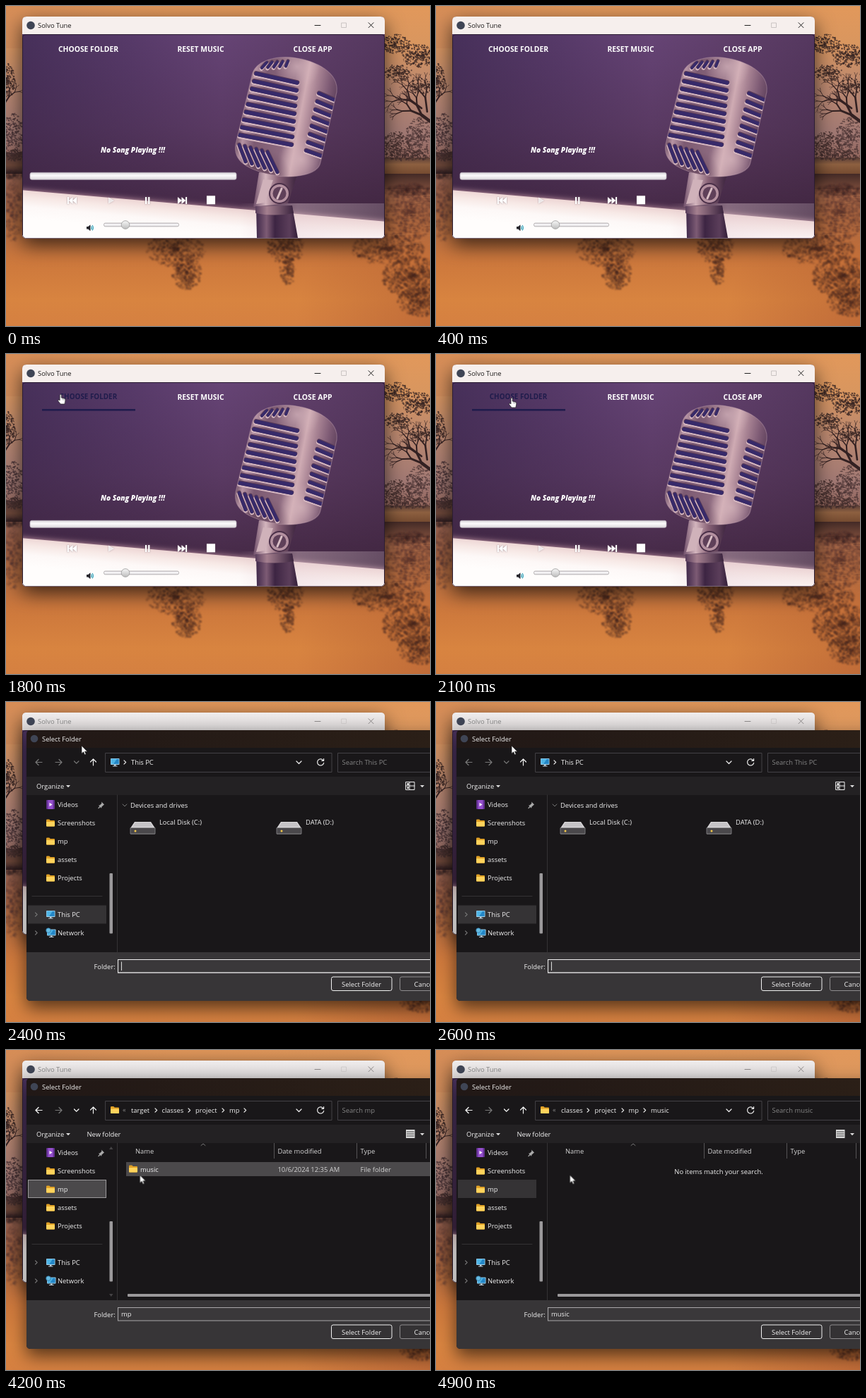
An HTML page with a canvas that plays this animation: 600x454 px, repeating every 5 s.

```html
<!DOCTYPE html>
<html lang="en">
<head>
<meta charset="utf-8">
<title>Music player</title>
<style>
html, body { margin: 0; width: 100%; height: 100%; overflow: hidden; background: #d08a50; }
canvas, svg { position: absolute; left: 0; top: 0; width: 600px; height: 454px; display: block; }
text { font-family: "Open Sans", "Noto Sans", sans-serif; font-size: 9.4px; fill: #f1f1f1; white-space: pre; }
.dark { fill: #1c1a1a; }
.dim { fill: #858585; }
.menu text, .hover text { font-weight: 700; font-size: 10.35px; text-anchor: middle; fill: #fff; }
.hover text { font-size: 9.9px; fill: #201c4c; }
.song { font-weight: 800; font-style: italic; font-size: 10.1px; text-anchor: middle; fill: #fff; }
.line { fill: none; stroke: #eee; stroke-width: 1.2; stroke-linecap: round; stroke-linejoin: round; }
.gray { stroke: #777; }
.thin { stroke-width: 1; }
.white { fill: #fff; filter: drop-shadow(0 0 1px #7a6670aa); }
.shadow { filter: drop-shadow(0 10px 12px #0009); }

/* Scene states */
.hover, .dialog, .inactive, .bare, .full, .pc, .mp, .music, .row, .over, .typed, .hand, .arrow, .caret {
  opacity: 0; animation: 5s step-end infinite;
}
.plain { animation: plain 5s step-end infinite; }
.hover { animation-name: hover; }
.dialog { animation-name: dialog; }
.inactive { animation-name: inactive; }
.bare { animation-name: bare; }
.full { animation-name: full; }
.pc { animation-name: pc; }
.mp { animation-name: mp; }
.music { animation-name: music; }
.row { animation-name: row; }
.over { animation-name: over; }
.typed { animation-name: typed; }
.caret { animation-name: caret; }
.hand { animation-name: hand; }
.arrow { animation-name: arrow; }
.pointer { animation: move 5s infinite; }
@keyframes plain { 36% { opacity: 0 } 48%, 100% { opacity: 1 } }
@keyframes hover { 36% { opacity: 1 } 48% { opacity: 0 } }
@keyframes dialog { 46% { opacity: .6 } 48%, 100% { opacity: 1 } }
@keyframes inactive { 46%, 100% { opacity: 1 } }
@keyframes bare { 46% { opacity: 1 } 54% { opacity: 0 } }
@keyframes full { 54% { opacity: 1 } 74% { opacity: 0 } }
@keyframes pc { 46% { opacity: 1 } 74% { opacity: 0 } }
@keyframes mp { 74% { opacity: 1 } 88% { opacity: 0 } }
@keyframes music { 88%, 100% { opacity: 1 } }
@keyframes row { 80% { opacity: 1 } 88% { opacity: 0 } }
@keyframes over { 66% { opacity: 1 } 74% { opacity: 0 } }
@keyframes typed { 74%, 100% { opacity: 1 } }
@keyframes caret { 48% { opacity: 1 } 56% { opacity: 0 } }
@keyframes hand { 36% { opacity: 1 } 46% { opacity: 0 } 62% { opacity: 1 } 72% { opacity: 0 } }
@keyframes arrow { 24% { opacity: 1 } 36% { opacity: 0 } 46% { opacity: 1 } 62% { opacity: 0 } 72%, 100% { opacity: 1 } }
@keyframes move {
  0%, 24% { transform: translate(-4px, 44px); animation-timing-function: step-end }
  26% { transform: translate(2.5px, 44.5px); animation-timing-function: steps(7, end) }
  40%, 54% { transform: translate(107px, 62px); animation-timing-function: steps(6, end) }
  66%, 72% { transform: translate(82.5px, 202px); animation-timing-function: steps(5, end) }
  82%, 100% { transform: translate(189.5px, 177.5px) }
}
</style>
</head>
<body>
<canvas id="scene" width="600" height="454"></canvas>
<svg viewBox="0 0 600 454">
  <defs>
    <linearGradient id="bar" x2="0" y2="1">
      <stop stop-color="#d5d1d6"/><stop offset=".4" stop-color="#fcfbfc"/><stop offset="1" stop-color="#dcd8dc"/>
    </linearGradient>
    <linearGradient id="knob" x2="0" y2="1"><stop stop-color="#f7f7f7"/><stop offset="1" stop-color="#bdbdbd"/></linearGradient>
    <linearGradient id="caption"><stop stop-color="#211816"/><stop offset="1" stop-color="#2b1f17"/></linearGradient>
    <linearGradient id="idle" x2="0" y2="1"><stop stop-color="#f0eded"/><stop offset="1" stop-color="#d6d2d2"/></linearGradient>
    <g id="folder">
      <path d="M0 1.2Q0 0 1.2 0H4.2L5.8 1.6H11Q12 1.6 12 2.8V9Q12 10 11 10H1Q0 10 0 9Z" fill="#e0a126"/>
      <path d="M0 3.4H11Q12 3.4 12 4.2V9Q12 10 11 10H1Q0 10 0 9Z" fill="#ffd35c"/>
    </g>
    <g id="monitor">
      <rect width="12.5" height="9" rx=".8" fill="#a9d7ee"/><rect x=".8" y=".8" width="10.9" height="7.2" fill="#2487c7"/>
      <path d="M.8 .8H9L4 8H.8Z" fill="#4fb5e6"/><path d="M5 9h2.5v1.5H9.5v1H3v-1h2Z" fill="#b8c6cf"/>
    </g>
    <g id="drive">
      <path d="M6 0H29L35 9H0Z" fill="#d9d7d9"/><path d="M7 1H28L32 7H3Z" fill="#c5c3c6"/>
      <rect y="8.5" width="35" height="9.5" rx="1" fill="#4a484b"/>
      <path d="M0 8.5H35V17H0Z" fill="none" stroke="#8a888b" stroke-width=".8"/><circle cx="7" cy="13" r="1.5" fill="#f2c84b"/>
    </g>
    <path id="next" d="M0 -2.6L2.6 0L0 2.6"/>
    <path id="skip" d="M-6.5 -5L-.8 0L-6.5 5ZM-1 -5L4.7 0L-1 5ZM4.6 -5h2V5h-2Z"/>
    <path id="controls" d="M437 27.5h8M475 24h6.500v6.500h-6.500ZM513 23.700l7 7m0-7l-7 7"/>
  </defs>

  <!-- Player window -->
  <path d="M23 40V21Q23 15 29 15H530Q536 15 536 21V40Z" fill="#f6efed"/>
  <circle cx="35" cy="27.5" r="5.8" fill="#3f4555"/>
  <text class="dark" x="45" y="31">Solvo Tune</text>
  <path class="line thin" d="M437 27.5h8M513 23.7l7 7m0-7l-7 7" style="stroke:#222"/>
  <path class="line thin" d="M475 24h6.5v6.5h-6.5Z" style="stroke:#c9c3c2"/>
  <g class="menu">
    <text class="plain" x="116.5" y="65">CHOOSE FOLDER</text>
    <text x="275.5" y="65">RESET MUSIC</text>
    <text x="434" y="65">CLOSE APP</text>
  </g>
  <g class="hover">
    <text x="116.5" y="64">CHOOSE FOLDER</text>
    <rect x="51" y="78" width="132" height="2.6" fill="#201c4c"/>
  </g>
  <text class="song" x="179.5" y="208">No Song Playing !!!</text>
  <rect x="34" y="236.3" width="292" height="10" rx="2.5" fill="url(#bar)" stroke="#b9b0bc" stroke-width=".8"/>
  <g class="white">
    <use href="#skip" transform="translate(93.5 276) scale(-1 1)"/>
    <path d="M145 271.5L153 276L145 280.5Z" opacity=".75"/>
    <path d="M197 271h2.2v10H197ZM201.2 271h2.2v10h-2.2Z"/>
    <use href="#skip" x="249.5" y="276"/>
    <rect x="284" y="269.3" width="12" height="12"/>
  </g>
  <path d="M114 313h2.2l3.2-2.8v9l-3.2-2.8H114Z" fill="#24232b"/>
  <path class="line" d="M120.7 312.8q1.3 1.9 0 3.8M122.3 311.5q2.2 3.2 0 6.4" style="stroke:#2b9db5"/>
  <rect x="138.5" y="308" width="106" height="4.8" rx="2" fill="url(#bar)" stroke="#aaa6a8" stroke-width=".8"/>
  <circle cx="169" cy="310.5" r="5.8" fill="url(#knob)" stroke="#999" stroke-width=".8"/>
  <g class="inactive">
    <path d="M23 40V21Q23 15 29 15H530Q536 15 536 21V40Z" fill="url(#idle)"/>
    <circle cx="35" cy="27.5" r="5.8" fill="#3f4555"/>
    <text class="dim" x="45" y="31">Solvo Tune</text>
    <path class="line thin" d="M437 27.5h8M513 23.7l7 7m0-7l-7 7" style="stroke:#8d8989"/>
    <path class="line thin" d="M475 24h6.5v6.5h-6.5Z" style="stroke:#d0cccc"/>
  </g>

  <!-- Folder dialog -->
  <g class="dialog">
    <path class="shadow" d="M29 46Q29 40 35 40H640V424H35Q29 424 29 418Z" fill="#191719"/>
    <path d="M29 65V46Q29 40 35 40H600V65Z" fill="url(#caption)"/>
    <rect x="29" y="106" width="571" height="26" fill="#232123"/>
    <path d="M29 355H600V424H35Q29 424 29 418Z" fill="#373537"/>
    <circle cx="40" cy="52" r="5.3" fill="#3f4555"/>
    <text x="51" y="55.5">Select Folder</text>

    <g class="line">
      <path class="gray" d="M42 85.5h9m-9 0l4-4m-4 4l4 4M79 85.5h-9m9 0l-4-4m4 4l-4 4M96.5 84l3.2 3.2l3.2-3.2"/>
      <path d="M123.5 90v-9m0 0l-4 4m4-4l4 4M411 84l3.5 3.5L418 84"/>
      <path d="M449 82.8a4.6 4.6 0 1 0 .7 3.5M449.6 80.5v2.8h-2.8"/>
      <path class="thin" style="stroke:#444246" d="M141 72.5H461V99.5H141ZM610 72.5H469.5V99.5H610"/>
      <path class="thin" style="stroke:#343234" d="M157.5 132V355M37 275.5H136"/>
    </g>
    <path class="line typed" d="M42 85.5h9m-9 0l4-4m-4 4l4 4M96.5 84l3.2 3.2l3.2-3.2"/>

    <text x="43" y="122.5">Organize</text>
    <path d="M85 118h6l-3 3.2ZM586 118h6l-3 3.2Z" fill="#ddd"/>

    <!-- Sidebar -->
    <rect class="pc" x="31" y="288.5" width="111" height="26" fill="#353335"/>
    <rect class="over" x="31" y="184" width="111" height="26" fill="#4d4b4d"/>
    <rect class="mp" x="31.5" y="184.5" width="110" height="25" fill="#4b494b" stroke="#9b999b"/>
    <rect class="music" x="31" y="184" width="111" height="26" fill="#353335"/>
    <g id="side"></g>
    <rect x="57.5" y="139" width="11" height="13" rx="1.2" fill="#9450cc"/>
    <path d="M57.5 139h2v13h-2ZM66.5 139h2v13h-2Z" fill="#653197"/>
    <path d="M61.5 143v5l4-2.5Z" fill="#fff"/>
    <path d="M135 141.5l4 4-1 .8-2.6 2.4-.4 2-4-4 2-.4 2.4-2.6Z" fill="#aaa"/>
    <path class="line" d="M131 150.5l2-2" style="stroke:#aaa"/>
    <use href="#monitor" x="57" y="296"/>
    <use href="#monitor" x="58" y="322.5"/>
    <circle cx="60" cy="324" r="3.3" fill="#68bde2" stroke="#286da0" stroke-width=".7"/>
    <g class="line gray"><use href="#next" x="41.5" y="301.5"/><use href="#next" x="41.5" y="327.5"/></g>
    <rect x="146.5" y="243" width="4.5" height="85.5" rx="1" fill="#9b999b"/>

    <!-- Drives view -->
    <g class="pc">
      <use href="#monitor" x="148" y="80"/>
      <g class="line"><use href="#next" x="167" y="85.5"/></g>
      <text x="177" y="89">This PC</text>
      <text class="dim" x="475.5" y="89">Search This PC</text>
      <path class="line thin" d="M566 113.5h12v11h-12ZM566 119h12M571 113.5v11"/>
      <path d="M567.5 115h2.5v3h-2.5ZM567.5 120.5h2.5v2.5h-2.5Z" fill="#eee"/>
      <path class="line thin gray" d="M165 145l3 3l3-3"/>
      <text x="176" y="149.5">Devices and drives</text>
      <use href="#drive" x="176" y="170"/><use href="#drive" x="383" y="170"/>
    </g>
    <g class="bare"><text x="217" y="174">Local Disk (C:)</text><text x="424" y="174">DATA (D:)</text></g>
    <g class="full">
      <g class="line"><use href="#next" x="215" y="85.5"/></g>
      <rect x="175" y="160.5" width="13" height="13" fill="#2b8fdb"/>
      <text x="217" y="169">Local Disk (C:)</text><text x="424" y="169">DATA (D:)</text>
      <path d="M216 173h154.5v12H216ZM423 173h154.5v12H423Z" fill="#e7e7e7"/>
      <path d="M216.5 173.5H304v11h-87.5ZM423.5 173.5H479.5v11h-56Z" fill="#27a0da"/>
      <text x="217" y="195.5">101 GB free of 236 GB</text><text x="424" y="195.5">584 GB free of 931 GB</text>
    </g>

    <!-- Folder views -->
    <g class="typed">
      <use href="#folder" x="148" y="80"/>
      <text class="dim" x="165" y="88">«</text>
      <text x="114.5" y="122.5">New folder</text>
      <path d="M566 113h12.5v12H566Z" fill="#d9d9d9"/>
      <path d="M567 116h10.5M567 119h10.5M567 122h10.5" stroke="#333" stroke-width=".9"/>
      <path class="line thin gray" d="M276 135.5l3-2.5l3 2.5"/>
      <path d="M379.5 132v22M496.5 132v22M594.5 132v22" stroke="#565456"/>
      <g opacity=".88"><text x="183" y="146.5">Name</text><text x="384.5" y="146.5">Date modified</text><text x="501.5" y="146.5">Type</text></g>
      <rect x="172" y="346" width="440" height="4" rx="1" fill="#9b999b"/>
    </g>
    <g class="mp">
      <g id="mpPath"></g>
      <text class="dim" x="475.5" y="89">Search mp</text>
      <path d="M146 141h5.5l-2.7-4ZM146 346h5.5l-2.7 4Z" fill="#454345"/>
      <rect class="row" x="170" y="159" width="430" height="20" fill="#4b494b"/>
      <use href="#folder" x="174" y="163.5"/>
      <text x="190" y="172.5">music</text>
      <g opacity=".82"><text x="384.5" y="172.5">10/6/2024 12:35 AM</text><text x="501.5" y="172.5">File folder</text></g>
    </g>
    <g class="music">
      <g id="musicPath"></g>
      <text class="dim" x="475.5" y="89">Search music</text>
      <text x="400" y="175.5" text-anchor="middle">No items match your search.</text>
    </g>

    <!-- Footer -->
    <text x="124.5" y="379">Folder:</text>
    <rect x="158.5" y="365.5" width="470" height="18.5" fill="#3a383a" stroke="#aaa8aa"/>
    <rect class="pc" x="158.5" y="365.5" width="470" height="18.5" fill="none" stroke="#f0f0f0"/>
    <path class="caret" d="M163.5 368.5v12.5" stroke="#ddd"/>
    <text class="mp" x="163" y="377.5">mp</text>
    <text class="music" x="163" y="377.5">music</text>
    <rect x="460.5" y="390" width="85.5" height="19.5" rx="2.5" fill="#343234" stroke="#f2f2f2"/>
    <text x="503" y="403.5" text-anchor="middle">Select Folder</text>
    <rect x="557.5" y="390" width="85.5" height="19.5" rx="2.5" fill="#343234" stroke="#8e8c8e"/>
    <text x="577.5" y="403.5">Cancel</text>
  </g>

  <g class="pointer">
    <path class="arrow" d="M0 0V11.2L2.6 8.8L4.4 12.8L6.2 12L4.5 8.2H8Z" fill="#fff" stroke="#222" stroke-width=".7"/>
    <g class="hand">
      <path d="M-1 1Q0 -1 1.2 1V5L5.5 6.2Q7.2 6.8 6.8 9L5.8 14H0L-3.4 9.6Q-3.6 7.6 -2.2 8L-1 9Z" fill="#fff" stroke="#222" stroke-width=".7"/>
      <path d="M2.8 6v2.4M4.6 6.500v2.200" stroke="#555" stroke-width=".5"/>
    </g>
  </g>
</svg>
<script>
const g = document.getElementById('scene').getContext('2d');
let seed = 11;
const rnd = () => (seed = (seed * 16807) % 2147483647) / 2147483647;

function grad(x0, y0, x1, y1, ...stops) {
  const f = g.createLinearGradient(x0, y0, x1, y1);
  stops.forEach(([at, c]) => f.addColorStop(at, c));
  return f;
}
function box(x, y, w, h, fill) { g.fillStyle = fill; g.fillRect(x, y, w, h); }
function shape(d, fill) { g.fillStyle = fill; g.fill(new Path2D(d)); }
function stroke(x0, y0, x1, y1, color, w) {
  g.strokeStyle = color; g.lineWidth = w; g.lineCap = 'round';
  g.beginPath(); g.moveTo(x0, y0); g.lineTo(x1, y1); g.stroke();
}
function glow(x, y, r, color) {
  const f = g.createRadialGradient(x, y, 0, x, y, r);
  f.addColorStop(0, color); f.addColorStop(1, color.slice(0, 7) + '00');
  box(x - r, y - r, 2 * r, 2 * r, f);
}
// Foliage: fine dabs, denser towards the centre
function leaves(x, y, rx, ry, density, color) {
  g.fillStyle = color;
  for (let n = rx * ry * density; n > 0; n--) {
    const a = rnd() * 6.283, k = rnd() ** .7;
    g.beginPath();
    g.ellipse(x + Math.cos(a) * rx * k, y + Math.sin(a) * ry * k, .6 + rnd() * 1.2, .5 + rnd() * .8, rnd(), 0, 6.3);
    g.fill();
  }
}
function branch(x, y, len, a, w, color) {
  if (len < 4) return;
  const x2 = x + Math.cos(a) * len, y2 = y + Math.sin(a) * len;
  stroke(x, y, x2, y2, color, w);
  branch(x2, y2, len * .74, a - .25 - rnd() * .4, w * .68, color);
  branch(x2, y2, len * .7, a + .25 + rnd() * .4, w * .68, color);
}

function landscape() {
  box(0, 0, 600, 454, grad(0, 0, 0, 454, [0, '#e0965a'], [.12, '#d6945f'], [.26, '#b98770'], [.4, '#a07873'], [.47, '#94685f'],
    [.57, '#9a6048'], [.68, '#b06a40'], [.8, '#cd783c'], [.92, '#d88440'], [1, '#d58041']));
  box(0, 0, 600, 60, grad(0, 0, 600, 0, [0, '#c0764f44'], [.4, '#e89d5a22'], [1, '#eca65f22']));
  glow(600, 454, 190, '#a9552f77');
  // Banks
  box(530, 215, 70, 24, grad(0, 215, 0, 239, [0, '#5a3e37'], [.4, '#8d6040'], [1, '#73492f']));
  box(530, 238, 70, 22, grad(0, 238, 0, 260, [0, '#432a26'], [1, '#7a4c3b']));
  box(0, 208, 24, 30, grad(0, 208, 0, 238, [0, '#56393a'], [.6, '#6b4638'], [1, '#3a2629']));
  const bark = '#332122';
  // Right bank
  branch(606, 168, 22, -2.5, 4.5, bark);
  branch(588, 145, 20, -2.5, 2.8, bark);
  branch(596, 150, 20, -1.7, 2.6, bark);
  const canopy = '#3a2725bb';
  leaves(552, 54, 20, 14, .7, canopy);
  leaves(584, 70, 24, 17, .7, canopy);
  leaves(555, 95, 21, 12, .7, canopy);
  leaves(588, 114, 18, 11, .6, canopy);
  leaves(585, 186, 20, 28, .55, '#4e3636bb');
  leaves(552, 198, 20, 20, .7, '#46302fbb');
  leaves(570, 212, 34, 8, .8, '#46302fbb');
  // Left bank
  branch(-3, 140, 14, -1, 2, bark);
  leaves(2, 106, 11, 24, .7, canopy);
  leaves(10, 182, 15, 30, .6, '#4b3538bb');
  leaves(12, 212, 14, 8, 1, '#46302fbb');
  // Reflections
  g.filter = 'blur(.9px)';
  const dark = '#40242299';
  leaves(240, 346, 42, 24, .5, dark);
  leaves(256, 378, 21, 24, .7, dark);
  leaves(396, 342, 26, 24, .6, dark);
  leaves(399, 374, 11, 22, .6, dark);
  leaves(540, 345, 52, 22, .5, dark);
  leaves(574, 384, 42, 30, .65, dark);
  leaves(588, 420, 34, 20, .7, dark);
  leaves(572, 292, 38, 42, .45, '#4a2c2b99');
  leaves(568, 262, 36, 8, .8, '#3d272699');
  leaves(10, 290, 13, 46, .4, '#50333399');
  leaves(12, 240, 14, 7, 1, '#36242799');
  g.filter = 'none';
  for (let i = 0; i < 50; i++) {
    const x = 540 + rnd() * 60, y = 262 + rnd() * 80;
    stroke(x, y, x + 4 + rnd() * 10, y, '#c27e5255', .8);
  }
}

function microphone() {
  const metal = grad(326, 160, 466, 186, [0, '#4d3147'], [.1, '#b693a3'], [.22, '#7c5a72'], [.5, '#8d6a7f'],
    [.62, '#cfabb3'], [.72, '#a98494'], [.85, '#7d5a74'], [1, '#4f3450']);
  // Neck and stand
  shape('M358 236L412 240L399 280L350 285Z', grad(350, 0, 408, 0, [0, '#6f4e69'], [.3, '#d3b5bd'], [.6, '#8a6478'], [1, '#452b45']));
  shape('M364 246L378 247L366 279L354 281Z', '#d0b2ba');
  shape('M354 285L405 284L413 329H355Z', grad(354, 0, 413, 0, [0, '#3f284a'], [.25, '#7d5b74'], [.45, '#3d2543'], [.8, '#5b3e5a'], [1, '#321d38']));
  shape('M353 284L405 283L407 294Q380 299 353 294Z', grad(353, 0, 407, 0, [0, '#5a3e5d'], [.3, '#a5808f'], [1, '#3a233e']));
  for (const [r, c] of [[15, '#4b3049'], [13, '#b591a0'], [9.5, '#5f4059']]) {
    g.fillStyle = c; g.beginPath(); g.arc(387, 266, r, 0, 7); g.fill();
  }
  stroke(384, 273, 390, 259, '#d9bec5', 3);
  // Head
  const head = 'M349 95C355 78 380 71 405 73C440 77 471 95 468 122L445 222C441 241 402 246 374 239C342 232 321 220 325 196Z';
  shape(head, metal);
  g.save();
  g.clip(new Path2D(head));
  glow(412, 86, 32, '#dcbcc2aa');
  glow(418, 218, 34, '#dcbcc2aa');
  glow(360, 245, 44, '#4a2d4488');
  const slot = (x0, y0, x1, y1, w) => {
    stroke(x0 - .6, y0 + 1.3, x1, y1 + 1.3, '#d6b8c1', w + 1.6);
    stroke(x0, y0 - .6, x1, y1 - .6, '#593b58', w + 1.2);
    stroke(x0, y0, x1, y1, '#372a6a', w);
  };
  for (let i = 0; i < 9; i++) slot(354 - 2.9 * i, 96 + 10.9 * i, 412 - i, 109 + 11 * i, 5.4);
  for (let i = 0; i < 8; i++) slot(443 - 2.6 * i, 124 + 11.6 * i, 464 - 2.5 * i, 133 + 11.4 * i, 5);
  for (let i = 0; i < 5; i++) slot(362 + 8.5 * i, 88 - .6 * i, 369 + 7.5 * i, 80 - .4 * i, 3.6);
  for (let i = 0; i < 6; i++) slot(330 + 8 * i, 197 + 2 * i, 339 + 9 * i, 221 + 3 * i, 4.4);
  g.restore();
  g.strokeStyle = '#c9a9b466'; g.lineWidth = 1.2; g.stroke(new Path2D(head));
}

function playerPhoto() {
  g.save();
  g.shadowColor = '#000a'; g.shadowBlur = 28; g.shadowOffsetY = 9;
  g.fillStyle = '#503868';
  g.beginPath(); g.roundRect(23, 15, 513, 315, 6); g.fill();
  g.restore();
  g.save();
  g.beginPath(); g.roundRect(23, 30, 513, 299.5, 5); g.clip();
  box(23, 40, 513, 290, grad(23, 0, 536, 0, [0, '#47305a'], [.3, '#573a69'], [.55, '#664475'], [.8, '#5e3e68'], [1, '#55385f']));
  box(23, 40, 513, 290, grad(0, 40, 0, 300, [0, '#3e234400'], [.5, '#42263f55'], [1, '#3b2138cc']));
  // Bright table top
  g.save();
  g.shadowColor = '#c79aa8'; g.shadowBlur = 8;
  shape('M10 260L550 307V345H10Z', grad(280, 283, 276, 325, [0, '#ecd3d2'], [.3, '#f7e9e6'], [.6, '#fdf8f7'], [1, '#fffdfc']));
  g.restore();
  box(330, 280, 206, 50, grad(330, 0, 536, 0, [0, '#d6b4c000'], [.4, '#e6ccd466'], [1, '#f3e4e833']));
  microphone();
  g.strokeStyle = '#2b1d33'; g.lineWidth = 1;
  g.beginPath(); g.roundRect(23.5, 40.5, 512, 289, 4); g.stroke();
  g.restore();
}

// Markup for repeated rows and breadcrumbs
const label = (x, y, s) => `<text x="${x}" y="${y}">${s}</text>`;
const icon = (id, x, y) => `<use href="#${id}" x="${x}" y="${y}"/>`;
const fill = (id, html) => { document.getElementById(id).innerHTML = html; };
const crumbs = (words, marks) => words.map(([x, s]) => label(x, 89, s)).join('') +
  `<g class="line">${marks.map(x => icon('next', x, 85.5)).join('')}</g>`;

const places = ['Videos', 'Screenshots', 'mp', 'assets', 'Projects', '', 'This PC', 'Network'];
fill('side', places.map((s, i) => label(73, 149 + 26 * i, s) +
  (i > 0 && i < 5 ? icon('folder', 57, 140.5 + 26 * i) : '')).join(''));
fill('mpPath', crumbs([[177, 'target'], [220.5, 'classes'], [268, 'project'], [316, 'mp']], [211, 258, 306, 337]));
fill('musicPath', crumbs([[177, 'classes'], [224.5, 'project'], [272.5, 'mp'], [304, 'music']], [214, 263, 294]));

landscape();
playerPhoto();
</script>
</body>
</html>
```
